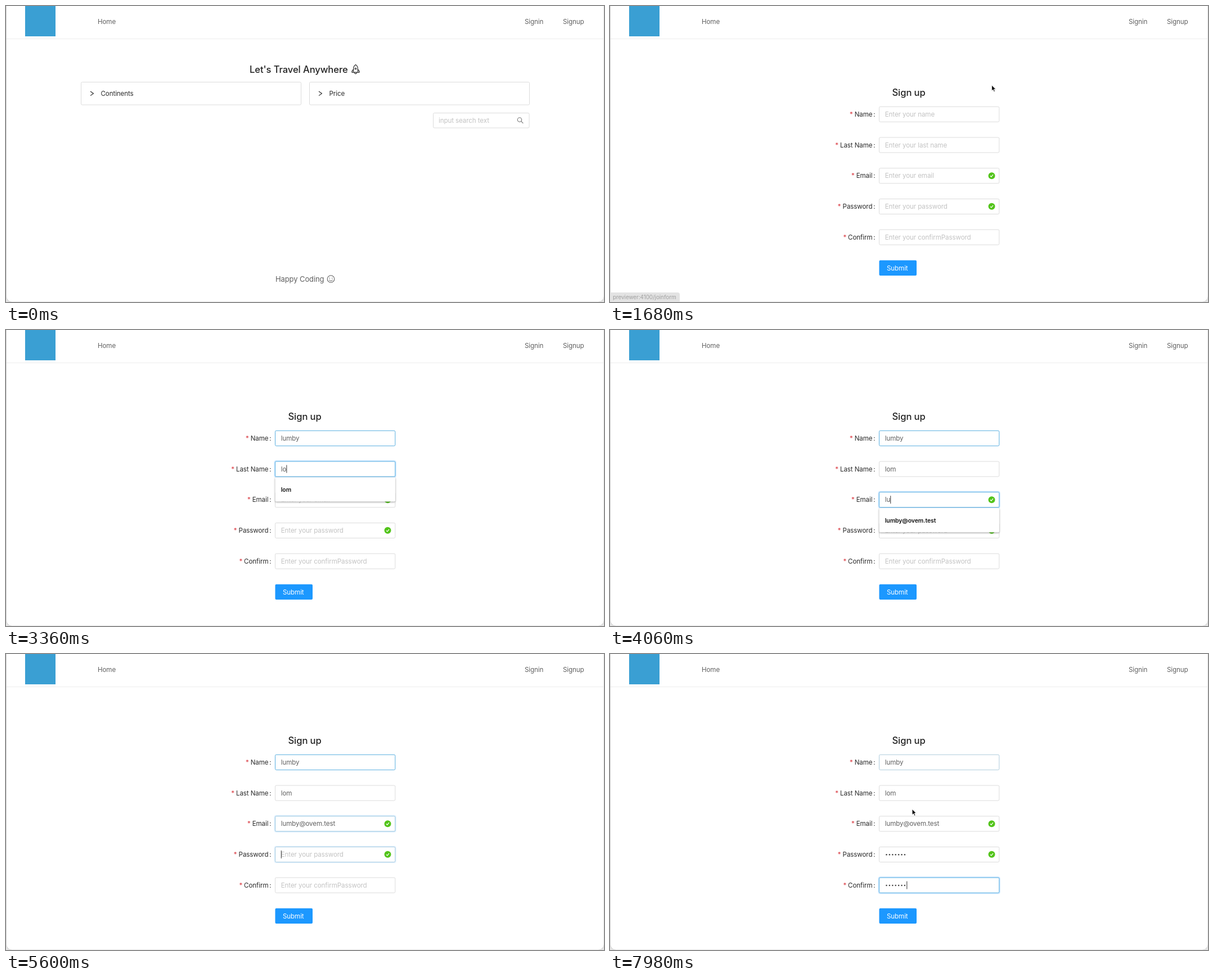
Animation of 1063 by 527 pixels, one loop 8000 ms. Source, as an HTML page:

```html
<!DOCTYPE html>
<html lang="en">
<head>
<meta charset="utf-8">
<title>Sign up</title>
<style>
html, body { margin: 0; width: 100%; height: 100%; overflow: hidden; background: #e4e4e4; }
svg { display: block; width: 1063px; height: 527px; }
text { font: 11.6px Inter, "Noto Sans CJK KR", "Noto Sans CJK", sans-serif; letter-spacing: -.1px; white-space: pre; }
text.head { font-size: 16.6px; font-weight: 450; }
text.foot { font-size: 13px; }
text.item { font-size: 10.5px; font-weight: 600; }
text.url { font-size: 10px; }
.menu { filter: drop-shadow(0 1px 1.5px rgba(0,0,0,.4)); }
</style>
</head>
<body>
<svg id="stage" viewBox="0 0 1063 527"></svg>
<script>
const LOOP = 8000, STEP = 70;
const INK = '#2b2b2b', GREY = '#606060', PALE = '#c3c3c3', EDGE = '#dcdcdc', BLUE = '#459bd3';
const stage = document.getElementById('stage');
const pen = document.createElement('canvas').getContext('2d');
pen.font = '11.6px Inter, sans-serif';

// at: focus start and end; keys: time of each typed character; menu: suggestion list
const fields = [
  { label: 'Name', hint: 'Enter your name', value: 'lumby', at: [2200, 3010],
    keys: [2380, 2450, 2590, 2730, 2800], hover: [2130, 7800],
    menu: { at: [2200, 2380], items: ['달무정', '소담1', '문가람', 'solbyeo', '구름토끼', '산책좋아하는고양이요'] } },
  { label: 'Last Name', hint: 'Enter your last name', value: 'lom', at: [3010, 3710],
    keys: [3220, 3360, 3500], menu: { at: [3220, 3500], items: ['lom'] } },
  { label: 'Email', hint: 'Enter your email', value: 'lumby@ovem.test', at: [3710, 5460], valid: true,
    keys: [3920, 4060, 4130, 4200, 4340, 4550, 4690, 4830, 4900, 4970, 5040, 5110, 5180, 5250, 5320],
    menu: { at: [3920, 5320], items: ['lumby@ovem.test'] } },
  { label: 'Password', hint: 'Enter your password', secret: true, at: [5460, 6930], valid: true,
    keys: [6160, 6230, 6370, 6440, 6580, 6650, 6790] },
  { label: 'Confirm', hint: 'Enter your confirmPassword', secret: true, at: [6930, 9000],
    keys: [7140, 7210, 7280, 7420, 7490, 7560, 7700] }
];

// time, x, y
const path = [[500, 1075, 150], [900, 999.5, 35.5], [1350, 999.5, 35.5], [1750, 650, 150],
  [2150, 555, 198], [7700, 555, 198], [7980, 537, 276]];

const within = (t, [a, b]) => t >= a && t < b;
const ease = u => { u = Math.max(0, Math.min(1, u)); return u * u * (3 - 2 * u); };
const fade = (t, [a, b]) => ease((t - a) / 300) * (1 - ease((t - b) / 300));
const mix = (a, b, u) => `rgb(${a.map((v, i) => Math.round(v + (b[i] - v) * u))})`;

const text = (x, y, s, fill = GREY, cls = '', anchor = 'start') =>
  `<text x="${x}" y="${y}" fill="${fill}" class="${cls}" text-anchor="${anchor}">${s}</text>`;
const box = (x, y, w, h, fill = '#fff', stroke = 'none', more = '') =>
  `<rect x="${x}" y="${y}" width="${w}" height="${h}" rx="2" fill="${fill}" stroke="${stroke}" ${more}/>`;
const line = (d, stroke = INK, w = 1.1, fill = 'none') =>
  `<path d="${d}" stroke="${stroke}" stroke-width="${w}" fill="${fill}" stroke-linejoin="round"/>`;
const dot = (x, y, r, fill, stroke = 'none') =>
  `<circle cx="${x}" cy="${y}" r="${r}" fill="${fill}" stroke="${stroke}" stroke-width="1.1"/>`;
const move = (x, y, s) => `<g transform="translate(${x} ${y})">${s}</g>`;

function frame(hover) {
  return '<rect x=".5" y="-10" width="1062.5" height="537" rx="10" fill="#fff" stroke="#cfcfcf"/>' +
    line('M1 58.5H1063', '#ececec', 1) +
    '<rect x="34" y="0" width="54" height="54" fill="#3a9fd3"/>' +
    text(163, 31.6, 'Home') + text(922, 31.6, 'Signin') +
    text(990, 31.6, 'Signup', hover ? BLUE : GREY) +
    (hover ? line('M973 56.5H1046', BLUE, 1.6) : '');
}

function panel(x, title) {
  return box(x, 135.5, 391, 40.5, '#fff', EDGE) +
    line(`M${x + 16.5} 152l5.5 3.8l-5.5 3.8`) + text(x + 35, 160, title, INK);
}

function home() {
  const rocket = line('M0-8C2.6-6.2 3.8-4 3.8-1.5V.5Q6.6 2.2 6.6 5.6H-6.6Q-6.6 2.2-3.8.5V-1.5C-3.8-4-2.6-6.2 0-8Z', INK, 1.2) +
    line('M-3.8 .5V5.6M3.8 .5V5.6M-2 5.6Q-2 8.2 0 8.2Q2 8.2 2 5.6', INK, 1.1) +
    dot(0, -1, 1.3, 'none', INK);
  const smile = dot(0, 0, 6.3, 'none', GREY) + dot(-2.3, -1.5, .8, GREY) + dot(2.3, -1.5, .8, GREY) +
    line('M-2.8 1.2Q-2.4 3.6 0 3.6Q2.4 3.6 2.8 1.2', GREY, 1);
  return text(433, 118.5, "Let's Travel Anywhere", '#222', 'head') + move(621.5, 112.5, rocket) +
    panel(133.5, 'Continents') + panel(539.5, 'Price') +
    box(759.5, 190.5, 170.5, 26.5, '#fff', EDGE) + text(769, 207.8, 'input search text', PALE) +
    dot(913, 202.5, 3.7, 'none', '#777') + line('M915.7 205.2l3.6 3.6', '#777', 1.2) +
    text(479, 491, 'Happy Coding', GREY, 'foot') + move(577.5, 486, smile);
}

function field(f, i, t) {
  const y = 192.7 + 54.72 * i, top = y - 13.4;
  const focus = fade(t, f.at);
  const lit = Math.max(focus, f.hover ? fade(t, f.hover) : 0);
  const n = f.keys.filter(k => k <= t).length;
  let s = text(471.5, y + 4.1, `<tspan fill="#d9363e">*</tspan><tspan dx="3">${f.label}</tspan><tspan dx="1.8">:</tspan>`, INK, '', 'end');
  s += box(478.5, top, 213.3, 27, '#fff', '#1890ff', `stroke-width="4" stroke-opacity="${focus * .22}"`) +
    box(478.5, top, 213.3, 27, '#fff', mix([220, 220, 220], [88, 174, 224], lit));
  let caret = 489.3;
  if (!n) s += text(488.7, y + 4.1, f.hint, PALE);
  else if (f.secret) {
    for (let k = 0; k < n; k++) s += dot(491.5 + 5.4 * k, y + .5, 1.25, '#444');
    caret = 490 + 5.4 * n;
  } else {
    const typed = f.value.slice(0, n);
    s += text(488.7, y + 4.1, typed);
    caret += pen.measureText(typed).width - .1 * n;
  }
  if (f.valid) s += dot(678.5, y, 6, '#52c41a') + line(`M675.9 ${y + .1}l1.9 2l3.2-4`, '#fff', 1.2);
  const last = n ? f.keys[n - 1] : f.at[0];
  if (within(t, f.at) && (t - last) % 1000 < 500) s += line(`M${caret} ${y - 7}v14`, '#333', 1);
  return s;
}

function menu(f, i, t) {
  if (!f.menu || !within(t, f.menu.at)) return '';
  const top = 207.5 + 54.72 * i, { items } = f.menu;
  return box(478.5, top, 213.5, 12.5 + 30.8 * items.length, '#fff', 'none', 'class="menu"') +
    items.map((s, k) => text(488.7, top + 25.8 + 30.8 * k, s, '#111', 'item')).join('');
}

function form(t) {
  return text(501.5, 159.8, 'Sign up', '#222', 'head') +
    fields.map((f, i) => field(f, i, t)).join('') +
    box(478.5, 452.7, 66.5, 27.2, '#1c98ff') + text(492, 470.5, 'Submit', '#fff') +
    fields.map((f, i) => menu(f, i, t)).join('');
}

function pointer(t) {
  const k = path.findIndex(p => p[0] > t);
  if (k < 0) return path[path.length - 1].slice(1);
  if (!k) return path[0].slice(1);
  const a = path[k - 1], b = path[k], u = ease((t - a[0]) / (b[0] - a[0]));
  return [a[1] + (b[1] - a[1]) * u, a[2] + (b[2] - a[2]) * u];
}

function cursor(t, x, y, hover) {
  if (t < 500 || within(t, [2380, 7700])) return '';
  const overInput = t > 1350 && x > 478 && x < 692 && fields.some((f, i) => Math.abs(y - 192.7 - 54.72 * i) < 13.5);
  if (hover) return move(x, y,
    line('M-1.5 7.5V.5A1.2 1.2 0 0 1 .9 .5V4.5L2 4.2L3.3 4.6L4.6 5L6.3 5.8V9.5L5 13.5H-1L-4.8 8.2Q-4.8 6.6-3.2 6.8Z', '#111', 1, '#fff') +
    line('M.6 8.5v3M2.3 8.5v3M4 8.5v3', '#111', .8));
  if (overInput) {
    const beam = 'M-2.5-6.5Q0-6.5 0-4.5Q0-6.5 2.5-6.5M0-4.5V4.5M-2.5 6.5Q0 6.5 0 4.5Q0 6.5 2.5 6.5M-1.5 2.5H1.5';
    return move(x, y, line(beam, '#fff', 2.4) + line(beam, '#111', 1.2));
  }
  return move(x, y, line('M0 0V10.6L2.5 8.3L4.2 12.2L6.1 11.4L4.4 7.6H7.6Z', '#fff', 1, '#111'));
}

function scene(t) {
  const [x, y] = pointer(t);
  const hover = x > 973 && x < 1046 && y < 58;
  const status = within(t, [980, 1820])
    ? '<path d="M0 510H120Q124 510 124 514V527H0Z" fill="#e3e3e3"/>' + text(5, 522, 'previewer:4100/joinform', '#a0a0a0', 'url') : '';
  return frame(hover) + (t < 1350 ? home() : form(t)) + status + cursor(t, x, y, hover);
}

let shown = -1;
function tick() {
  const t = Math.floor(performance.now() % LOOP / STEP) * STEP;
  if (t !== shown) stage.innerHTML = scene(shown = t);
  requestAnimationFrame(tick);
}
tick();
</script>
</body>
</html>
```
